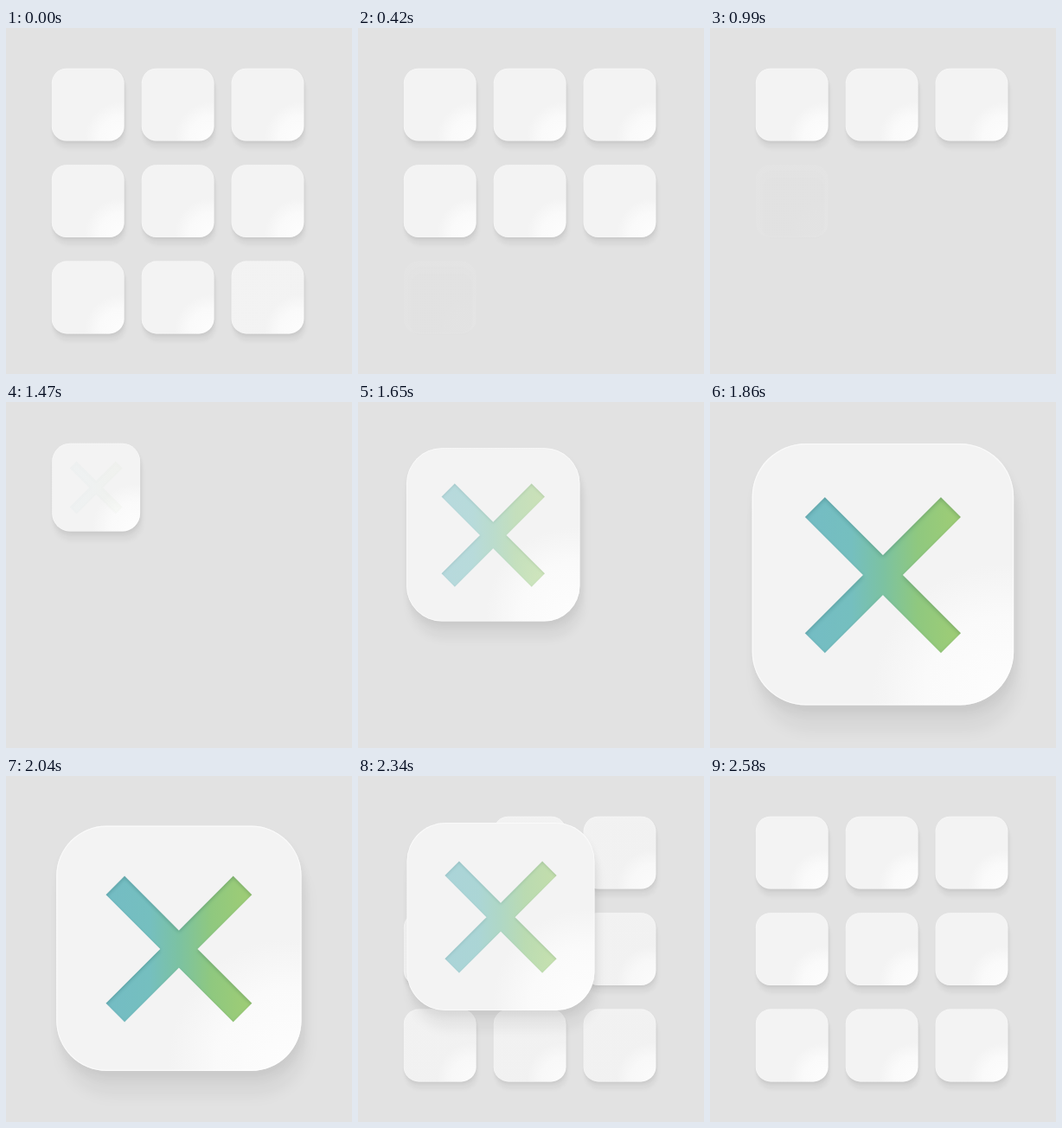
Write an HTML page with a canvas that moves like this. It is 400 px wide and 400 px high and loops after 2.73 s.

```html
<!DOCTYPE html>
<html>
<head>
<meta charset="utf-8">
<style>
html, body { margin: 0; height: 100%; overflow: hidden; background: #e2e2e2; }
canvas { display: block; }
</style>
</head>
<body>
<canvas width="400" height="400"></canvas>
<script>
const ctx = document.querySelector('canvas').getContext('2d');
const LOOP = 2730, SMALL = 83.8, LARGE = 283, PEAK = 320;
// Fade-out starts, from the last tile back to the second
const FADE_STARTS = [0, 105, 285, 495, 675, 855, 1005, 1185];
const FADE = 150;

const clamp = v => Math.min(1, Math.max(0, v));
const span = (t, a, b) => clamp((t - a) / (b - a));
const mix = (a, b, p) => a + (b - a) * p;
const smooth = p => p * p * (3 - 2 * p);

function tilePath(x, y, s) {
  const path = new Path2D();
  path.roundRect(x, y, s, s, s * 0.205);
  return path;
}

// Only the shadow lands on the stage; the shape itself stays outside
function castShadow(path, dx, dy, blur, alpha) {
  ctx.save();
  ctx.shadowColor = `rgba(0,0,0,${alpha})`;
  ctx.shadowOffsetX = 1000 + dx;
  ctx.shadowOffsetY = dy;
  ctx.shadowBlur = blur;
  ctx.translate(-1000, 0);
  ctx.fillStyle = '#000';
  ctx.fill(path);
  ctx.restore();
}

function drawTile(cx, cy, s, alpha) {
  if (alpha <= 0) return;
  const x = cx - s / 2, y = cy - s / 2, path = tilePath(x, y, s);
  ctx.save();
  ctx.globalAlpha = alpha;
  castShadow(path, s * 0.02, s * 0.1, s * 0.06, 0.05);
  castShadow(path, s * 0.008, s * 0.03, s * 0.04, 0.06);
  const fill = ctx.createRadialGradient(x + s * 0.96, y + s * 0.96, 0, x + s * 0.96, y + s * 0.96, s * 0.5);
  fill.addColorStop(0, '#fdfdfd');
  fill.addColorStop(0.6, '#fafafa');
  fill.addColorStop(1, '#f3f3f3');
  ctx.fillStyle = fill;
  ctx.fill(path);
  ctx.clip(path);
  ctx.strokeStyle = 'rgba(255,255,255,.6)';
  ctx.lineWidth = s * 0.008;
  ctx.stroke(path);
  ctx.restore();
}

function crossPath(s) {
  const a = s * 0.3675, b = s * 0.054;
  const path = new Path2D();
  [[-b, -a], [b, -a], [b, -b], [a, -b], [a, b], [b, b],
   [b, a], [-b, a], [-b, b], [-a, b], [-a, -b], [-b, -b]].forEach(([x, y]) =>
    path.lineTo((x - y) * Math.SQRT1_2, (x + y) * Math.SQRT1_2));
  path.closePath();
  return path;
}

function drawCross(cx, cy, s, alpha) {
  if (alpha <= 0) return;
  const path = crossPath(s), half = s * 0.3;
  ctx.save();
  ctx.globalAlpha = alpha;
  ctx.translate(cx, cy + s * 0.003);
  const fill = ctx.createLinearGradient(-half, 0, half, 0);
  fill.addColorStop(0, '#74bcc4');
  fill.addColorStop(0.3, '#75bfbf');
  fill.addColorStop(0.5, '#7cc2a2');
  fill.addColorStop(0.72, '#8fc87f');
  fill.addColorStop(1, '#a0cd74');
  ctx.fillStyle = fill;
  ctx.fill(path);
  // Inner shadow along the upper edges
  ctx.clip(path);
  const outside = new Path2D();
  outside.rect(-400, -400, 800, 800);
  outside.addPath(path);
  ctx.shadowColor = 'rgba(0,50,50,.22)';
  ctx.shadowOffsetY = s * 0.007;
  ctx.shadowBlur = s * 0.016;
  ctx.fillStyle = '#f3f3f3';
  ctx.fill(outside, 'evenodd');
  ctx.restore();
}

function mainSize(t) {
  if (t < 1900) {
    const p = span(t, 1440, 1900);
    return mix(SMALL, PEAK, p + 0.14 * p * (1 - p));
  }
  if (t < 2050) return mix(PEAK, LARGE, smooth(span(t, 1900, 2050)));
  return mix(LARGE, SMALL, span(t, 2085, 2575) ** 1.7);
}

function tileAlpha(i, t) {
  if (t > 2050) return span(t, 2130, 2350);
  const start = FADE_STARTS[8 - i];
  return 1 - span(t, start, start + FADE);
}

function draw(t) {
  ctx.fillStyle = '#e2e2e2';
  ctx.fillRect(0, 0, 400, 400);
  for (let i = 1; i < 9; i++) {
    drawTile(94.7 + 103.9 * (i % 3), 88.7 + 111.4 * Math.floor(i / 3), SMALL, tileAlpha(i, t));
  }
  const s = mainSize(t), k = clamp((s - SMALL) / (LARGE - SMALL));
  const cx = mix(94.7, 199.9, k), cy = mix(88.7, 199.2, k);
  drawTile(cx, cy, s, 1);
  drawCross(cx, cy, s, k ** 1.4);
}

const begin = performance.now();
function tick() {
  draw((performance.now() - begin) % LOOP);
  requestAnimationFrame(tick);
}
tick();
</script>
</body>
</html>
```
